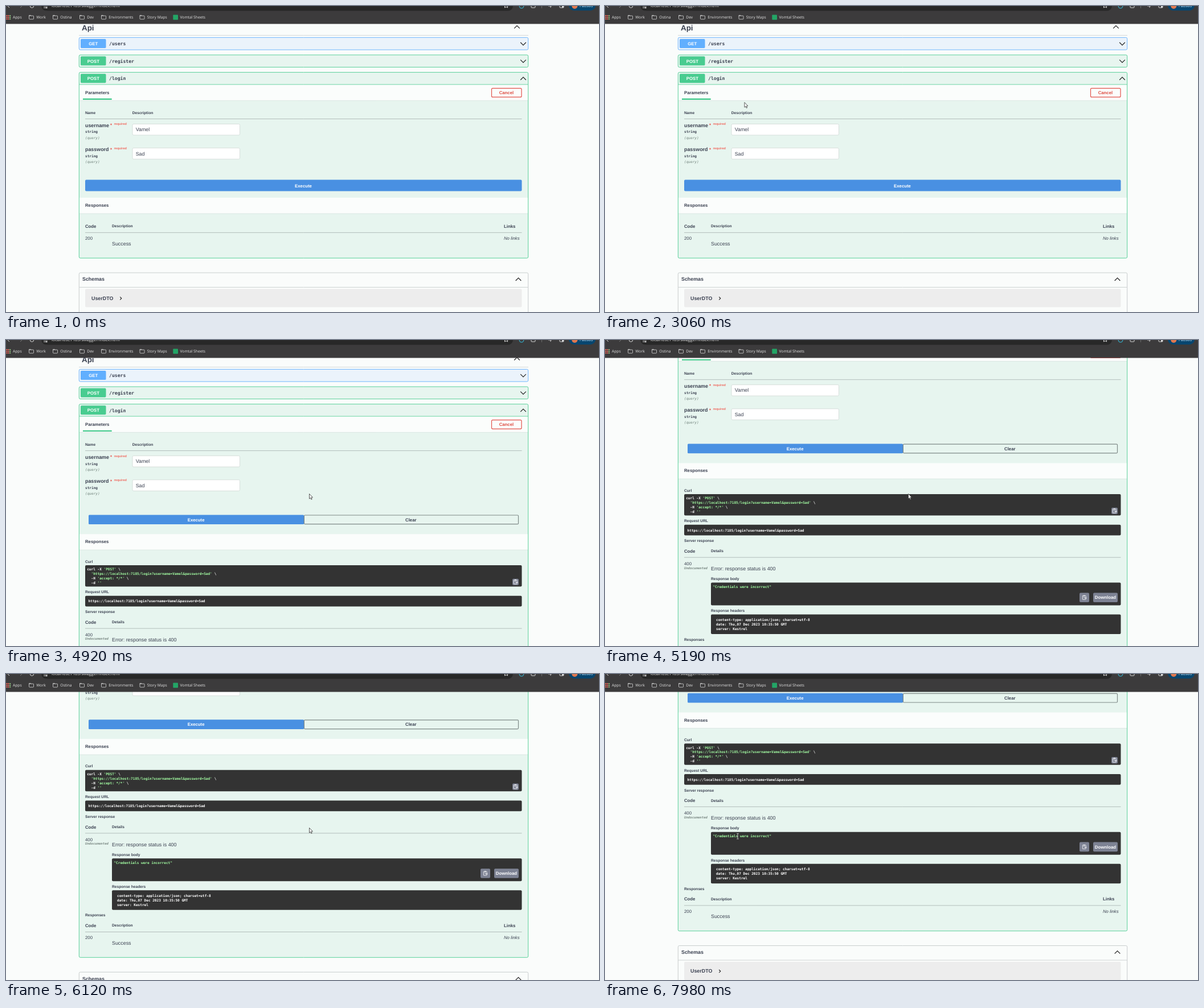
Recreate the animation shown at these times as an HTML page with a canvas. Size 1041 px wide and 538 px high, loop 8000 ms.

```html
<!DOCTYPE html>
<html lang="en">
<head>
<meta charset="utf-8">
<title>API console</title>
<style>
html, body { margin: 0; width: 100%; height: 100%; overflow: hidden; background: #fafcfb; }
canvas { display: block; }
</style>
</head>
<body>
<canvas id="stage" width="1041" height="538"></canvas>
<script>
const ctx = document.getElementById('stage').getContext('2d');
const W = 1041, H = 538, LOOP = 8000, BAR = 31.5;
const SANS = '"Liberation Sans", Arial, sans-serif';
const MONO = '"DejaVu Sans Mono", monospace';
const UI = '"Open Sans", "Noto Sans", sans-serif';
const INK = '#3b4151', GREEN = '#49cc90', BLUE = '#61affe', MINT = '#e7f5ef';
const CODE = '#333333', LIME = '#a2fca2', PAGE = '#fafcfb', USER = 'Vamel';
const S = 5 / 9; // page zoom
const px = n => n * S;
const CLICKED = 4110, ANSWERED = 4400;

const clamp = v => Math.max(0, Math.min(1, v));
const ease = v => { v = clamp(v); return v * v * (3 - 2 * v); };

function text(str, x, y, size, style = '', color = INK, align = 'left', family = SANS) {
  ctx.font = `${style} ${size}px ${family}`;
  ctx.textAlign = align;
  ctx.fillStyle = color;
  ctx.fillText(str, x, y + size * 0.36);
}
const bold = (str, x, y, size, color, align) => text(str, x, y, px(size), 'bold', color, align);
const mono = (str, x, y, color = '#fff', style = 'bold', size = 6.09) =>
  text(str, x, y, size, style, color, 'left', MONO);

function box(x, y, x2, y2, fill, stroke, r = 2, lw = 1) {
  ctx.beginPath();
  ctx.roundRect(x, y, x2 - x, y2 - y, r);
  if (fill) { ctx.fillStyle = fill; ctx.fill(); }
  if (stroke) { ctx.strokeStyle = stroke; ctx.lineWidth = lw; ctx.stroke(); }
}
function line(points, color, lw = 1) {
  ctx.beginPath();
  points.forEach(([x, y]) => ctx.lineTo(x, y));
  ctx.strokeStyle = color;
  ctx.lineWidth = lw;
  ctx.stroke();
}
const rule = (y, x = 139, x2 = 905.5, color = '#a5b0ae') => line([[x, y], [x2, y]], color, 0.8);
function chevron(x, y, up) {
  const d = up ? -2.4 : 2.4;
  line([[x - 4.8, y - d], [x, y + d], [x + 4.8, y - d]], '#222', 1.2);
}
function ring(x, y, r, color, lw, from = 0, to = Math.PI * 2) {
  ctx.beginPath();
  ctx.arc(x, y, r, from, to);
  ctx.strokeStyle = color;
  ctx.lineWidth = lw;
  ctx.stroke();
}
function dot(x, y, r, color) {
  ctx.beginPath();
  ctx.arc(x, y, r, 0, Math.PI * 2);
  ctx.fillStyle = color;
  ctx.fill();
}

function route(y, verb, path, color) {
  box(131, y + 3, 175.5, y + 19, color, null, 1.7);
  bold(verb, 153.3, y + 11.2, 14, '#fff', 'center');
  mono(path, 181, y + 11.3, INK, 'bold', 8.12);
}
function strip(y, y2) {
  ctx.fillStyle = '#fbfdfc';
  ctx.fillRect(128.5, y, 788, y2 - y);
  rule(y2, 128.5, 916.5, '#d5e3dd');
}
function field(y, name, value) {
  bold(name, 139, y - 7.5, 16);
  bold('*', 183, y - 7.5, 14, '#e8483f');
  bold('required', 189.7, y - 9.6, 10, '#f0695f');
  mono('string', 139, y + 4.3, INK);
  mono('(query)', 139, y + 14.8, '#6f807a', 'italic');
  box(222, y - 9.5, 410.5, y + 10, '#fff', '#d4dcd9', 2, 0.9);
  text(value, 227.7, y + 0.1, px(16));
}
function clipButton(x, y, x2, y2) {
  box(x, y, x2, y2, '#7d8293', null, 2);
  const cx = (x + x2) / 2, cy = (y + y2) / 2;
  box(cx - 3.2, cy - 3.2, cx + 2.6, cy + 3.6, null, '#fff', 0.6, 0.8);
  box(cx - 1.6, cy - 4, cx + 1, cy - 2.4, '#fff', null, 0.4);
  line([[cx - 1.8, cy - 0.8], [cx + 0.8, cy - 0.8]], '#fff', 0.7);
  line([[cx + 4, cy + 1], [cx, cy + 1]], '#fff', 1);
}

function responseTable(dy) {
  bold('Code', 139, 387 + dy, 14);
  bold('Description', 186, 386.8 + dy, 12);
  bold('Links', 874, 387 + dy, 14);
  rule(398.4 + dy);
  text('200', 139, 408.5 + dy, px(14));
  text('Success', 186, 417.7 + dy, px(16));
  text('No links', 874, 408.5 + dy, px(14), 'italic');
}

function schemas(dy) {
  box(128.3, 469 + dy, 916.7, 600 + dy, null, '#c2c8c8', 2.2, 0.9);
  bold('Schemas', 134, 480.2 + dy, 16);
  chevron(899.5, 480.6 + dy, true);
  rule(494.5 + dy, 128.5, 916.5, '#c2c8c8');
  box(139, 497.5 + dy, 905.5, 529.5 + dy, '#ededed', null, 2);
  bold('UserDTO', 150, 513.3 + dy, 16);
  line([[200.2, 511.4 + dy], [202.8, 514 + dy], [200.2, 516.6 + dy]], '#222', 1.1);
}

function executeButton(hover) {
  ctx.save();
  if (hover) { ctx.shadowColor = 'rgba(0,0,0,.4)'; ctx.shadowBlur = 4; }
  box(139, 305.5, 905.5, 325.6, '#4990e2', null, 2);
  ctx.restore();
  bold('Execute', 522, 315.7, 14, '#fff', 'center');
}

function spinner(t) {
  const a = (t - 4160) / 1000 * Math.PI * 2 - Math.PI / 2;
  ring(522.3, 367.8, 16.2, '#d3dfda', 1.1);
  ring(522.3, 367.8, 16.2, '#566160', 1.2, a - Math.PI / 4, a + Math.PI / 4);
  bold('LOADING', 522.3, 368.2, 10, INK, 'center');
}

function answer() {
  const url = `https://localhost:7185/login?username=${USER}&password=Sad`;
  const step = 3.666, cx = 142.2;
  box(145, 311.4, 523, 328, '#4990e2', null, 1.5);
  box(523.4, 311.9, 899.5, 327.6, null, '#7f8a88', 1.5, 1.2);
  bold('Execute', 333.6, 319.6, 14, '#fff', 'center');
  bold('Clear', 710.8, 319.6, 14, INK, 'center');
  strip(345.2, 373);
  bold('Responses', 139, 358.5, 14);

  bold('Curl', 139, 393, 12);
  box(139, 399.8, 905.5, 437.4, CODE);
  mono('curl -X', cx, 407);
  mono("'POST'", cx + 8 * step, 407, LIME);
  mono('\\', cx + 15 * step, 407);
  mono(`'${url}'`, cx + 2 * step, 414.8, LIME);
  mono('\\', cx + 61 * step, 414.8);
  mono('-H', cx + 2 * step, 422.6);
  mono("'accept: */*'", cx + 5 * step, 422.6, LIME);
  mono('\\', cx + 19 * step, 422.6);
  mono('-d', cx + 2 * step, 430.4);
  mono("''", cx + 5 * step, 430.4, LIME);
  clipButton(889, 423.6, 900, 434.8);

  bold('Request URL', 139, 446.8, 12);
  box(139, 453.6, 905.5, 472.4, CODE);
  mono(url, 144.6, 463.2);
  bold('Server response', 139, 481.9, 12);
  bold('Code', 139, 499.9, 14);
  bold('Details', 186, 499.7, 12);
  rule(511);
  text('400', 139, 521.8, px(14));
  mono('Undocumented', 139, 529.3, '#7c8a85', 'italic bold', 5.68);
  text('Error: response status is 400', 186, 530.6, px(16));

  bold('Response body', 186, 548.5, 12);
  box(186, 555.4, 905.5, 595.4, CODE);
  mono('"Credentials were incorrect"', 189.4, 562.7, LIME);
  clipButton(833, 573.2, 850, 589.8);
  box(857, 573.2, 900, 589.8, '#7d8293', null, 2);
  bold('Download', 878.4, 581.5, 14, '#fff', 'center');
  bold('Response headers', 186, 604.8, 12);
  box(186, 611.4, 905.5, 645.9, CODE);
  ['content-type: application/json; charset=utf-8',
   'date: Thu,07 Dec 2023 10:35:50 GMT',
   'server: Kestrel'].forEach((s, i) => mono(s, 195, 620.8 + i * 7.9));
  bold('Responses', 139, 655.1, 12);
}

function page(t, hover) {
  const loading = t >= CLICKED && t < ANSWERED, done = t >= ANSWERED;
  const dy = done ? 286.2 : loading ? 64.5 : 0;
  bold('Api', 133, 37.9, 24);
  chevron(897, 37, true);
  rule(51.6, 128, 917, '#c9cfcf');
  box(128.3, 55.4, 916.7, 77, '#ebf3fb', BLUE, 2.2, 0.9);
  route(55, 'GET', '/users', BLUE);
  chevron(908, 66.4);
  box(128.3, 86, 916.7, 107.6, MINT, GREEN, 2.2, 0.9);
  route(85.6, 'POST', '/register', GREEN);
  chevron(908, 97);

  box(128.3, 116.6, 916.7, 443.2 + dy, MINT, null, 2.2);
  route(116.2, 'POST', '/login', GREEN);
  chevron(908, 127.6, true);
  strip(138, 166.3);
  rule(138, 128.5, 916.5, GREEN);
  bold('Parameters', 139, 152.3, 14);
  box(135, 162.6, 185.7, 164.9, GREEN, null, 0);
  box(852.5, 144.6, 905, 160.2, null, '#e2514a', 2, 1.2);
  bold('Cancel', 878.4, 152.3, 14, '#de4b40', 'center');
  bold('Name', 139, 187.8, 12);
  bold('Description', 221.7, 187.8, 12);
  rule(198.5);
  field(217, 'username', USER);
  field(259.2, 'password', 'Sad');

  if (done) {
    answer();
  } else {
    executeButton(hover);
    if (loading) spinner(t);
    strip(337 + dy, 365 + dy);
    bold('Responses', 139, 350.6 + dy, 14);
  }
  responseTable(dy);
  box(128.3, 116.6, 916.7, 443.2 + dy, null, GREEN, 2.2, 0.9);
  schemas(dy);
}

function browserBar() {
  const pale = '#d6d6d6';
  const label = (s, x, y, size, color = '#e6e6e6') => text(s, x, y, size, '', color, 'left', UI);
  ctx.fillStyle = '#3c3b3c';
  ctx.fillRect(0, 0, W, BAR);
  box(62, -12, 890, 8.6, '#282828', null, 9);
  label('localhost:7185/swagger/index.html', 80, -0.4, 7.35);
  line([[6, 3], [3, 0]], pale);
  line([[25, 3], [28, 0]], '#777');
  ring(45.5, 0, 3.2, pale, 1);
  line([[66, 0], [73, 0]], pale);
  line([[66, 3], [73, 3]], pale);
  dot(71, 3, 1.3, pale);
  line([[875.5, -1], [875.5, 3], [878, 1.5], [880.5, 3], [880.5, -1]], pale);
  ring(905, 0, 3.8, '#35a3bd', 1.3);
  box(922, -4, 929, 3, null, pale, 1);
  line([[940.5, 0], [940.5, 4]], '#6a6a6a');
  line([[952, 0], [958, 0]], pale);
  line([[956, 0], [956, 3]], pale);
  box(972, -4, 979, 3, null, pale, 1);
  box(976, -4, 979, 3, pale, null, 0);
  box(988, -12, 1035, 8, '#08466f', null, 9);
  dot(998.3, 0, 5, '#e0784f');
  label('Paused', 1007, -0.4, 6.8, '#c6e5fa');

  const hues = ['#e9695e', '#e9695e', '#8fbf7f'];
  for (let i = 0; i < 9; i++) box(0.4 + i % 3 * 2.9, 16 + (i / 3 | 0) * 2.9, 2.4 + i % 3 * 2.9, 18 + (i / 3 | 0) * 2.9, hues[i % 3], null, 0);
  label('Apps', 12, 20, 6.7);
  [['Work', 40], ['Ostina', 82], ['Dev', 129], ['Environments', 167], ['Story Maps', 234.5]].forEach(([s, x]) => {
    ctx.beginPath();
    ctx.roundRect(x + 0.5, 17.2, 8, 6, 0.8);
    ctx.moveTo(x + 0.5, 18);
    ctx.lineTo(x + 0.5, 16.4);
    ctx.lineTo(x + 3.4, 16.4);
    ctx.lineTo(x + 4.4, 17.4);
    ctx.strokeStyle = pale;
    ctx.lineWidth = 0.8;
    ctx.stroke();
    label(s, x + 13.3, 20, 6.7);
  });
  box(293.3, 15.5, 302, 24.2, '#23a566', null, 0.8);
  label('Vomtal Sheets', 305.5, 20, 6.7);
}

// time, x, y
const PATH = [
  [330, 1034, 497], [600, 800, 330], [780, 545, 222], [1020, 443, 334], [1280, 443, 334],
  [1700, 195, 144.7], [1850, 198, 128], [2030, 200, 140], [2100, 200, 140], [2300, 226, 126],
  [2500, 190, 142], [2700, 210, 128], [2860, 196, 143], [2920, 196, 143], [3500, 522, 318],
  [4430, 522, 318], [4700, 532, 270], [6310, 532, 270], [6670, 286, 284], [6740, 286, 284],
  [7100, 224, 284], [7480, 268, 285], [7550, 268, 285], [7650, 220.5, 285], [7760, 270, 285],
  [7900, 270, 285], [7975, 233, 285]
];
function pointer(t) {
  if (t < PATH[0][0]) return null;
  const i = PATH.findIndex(p => p[0] > t);
  if (i < 0) return PATH[PATH.length - 1].slice(1);
  const [t0, x0, y0] = PATH[i - 1], [t1, x1, y1] = PATH[i];
  const k = ease((t - t0) / (t1 - t0));
  return [x0 + (x1 - x0) * k, y0 + (y1 - y0) * k];
}

function shape(points) {
  ctx.beginPath();
  points.forEach(([x, y]) => ctx.lineTo(x, y));
  ctx.closePath();
  ctx.fillStyle = '#fff';
  ctx.fill();
  ctx.strokeStyle = '#333';
  ctx.lineWidth = 0.8;
  ctx.stroke();
}
const CURSORS = {
  arrow: () => shape([[0.5, 0.5], [0.5, 9.2], [2.5, 7.4], [3.8, 10.4], [5.2, 9.8], [3.9, 6.9], [6.4, 6.7]]),
  hand: () => shape([[-1, 0], [0.6, 0], [0.9, 4], [5.4, 5.4], [5.4, 8.5], [4.3, 11.8], [-0.6, 11.8], [-3.6, 7], [-2.6, 6.2], [-1, 7.6]]),
  beam(light) {
    const c = light ? '#d5d5d5' : '#222';
    line([[0, -4], [0, 4.5]], c, 0.9);
    line([[-1.8, -4.5], [1.8, -4.5]], c, 0.8);
    line([[-1.8, 5], [1.8, 5]], c, 0.8);
  },
  blocked() {
    dot(1.6, 0.3, 4.3, '#fff');
    ring(1.6, 0.3, 3.4, '#d9483b', 1.4);
    line([[-0.8, -2.1], [4, 2.7]], '#d9483b', 1.4);
  }
};
function drawPointer(t, x, y, onButton) {
  const onInput = t < 4000 && x > 222 && x < 410 && (Math.abs(y - 217) < 10 || Math.abs(y - 259) < 10);
  const onCode = t > 6300 && y > 278;
  const kind = onButton ? (t >= CLICKED ? 'blocked' : 'hand') : onInput || onCode ? 'beam' : 'arrow';
  ctx.save();
  ctx.translate(x, y);
  CURSORS[kind](onCode);
  ctx.restore();
}

const scroll = t => 166.7 * ease((t - 4880) / 450) + 110.9 * ease((t - 5905) / 390);

function draw(now) {
  const t = now % LOOP, at = pointer(t);
  const onButton = !!at && t < ANSWERED && at[0] > 139 && at[0] < 905 && at[1] > 305 && at[1] < 326;
  ctx.textRendering = 'geometricPrecision';
  ctx.fillStyle = PAGE;
  ctx.fillRect(0, 0, W, H);
  ctx.save();
  ctx.translate(0, -scroll(t));
  page(t, onButton);
  ctx.restore();
  browserBar();
  if (at) drawPointer(t, at[0], at[1], onButton);
}

const start = performance.now();
function tick() {
  draw(performance.now() - start);
  requestAnimationFrame(tick);
}
tick();
</script>
</body>
</html>
```
